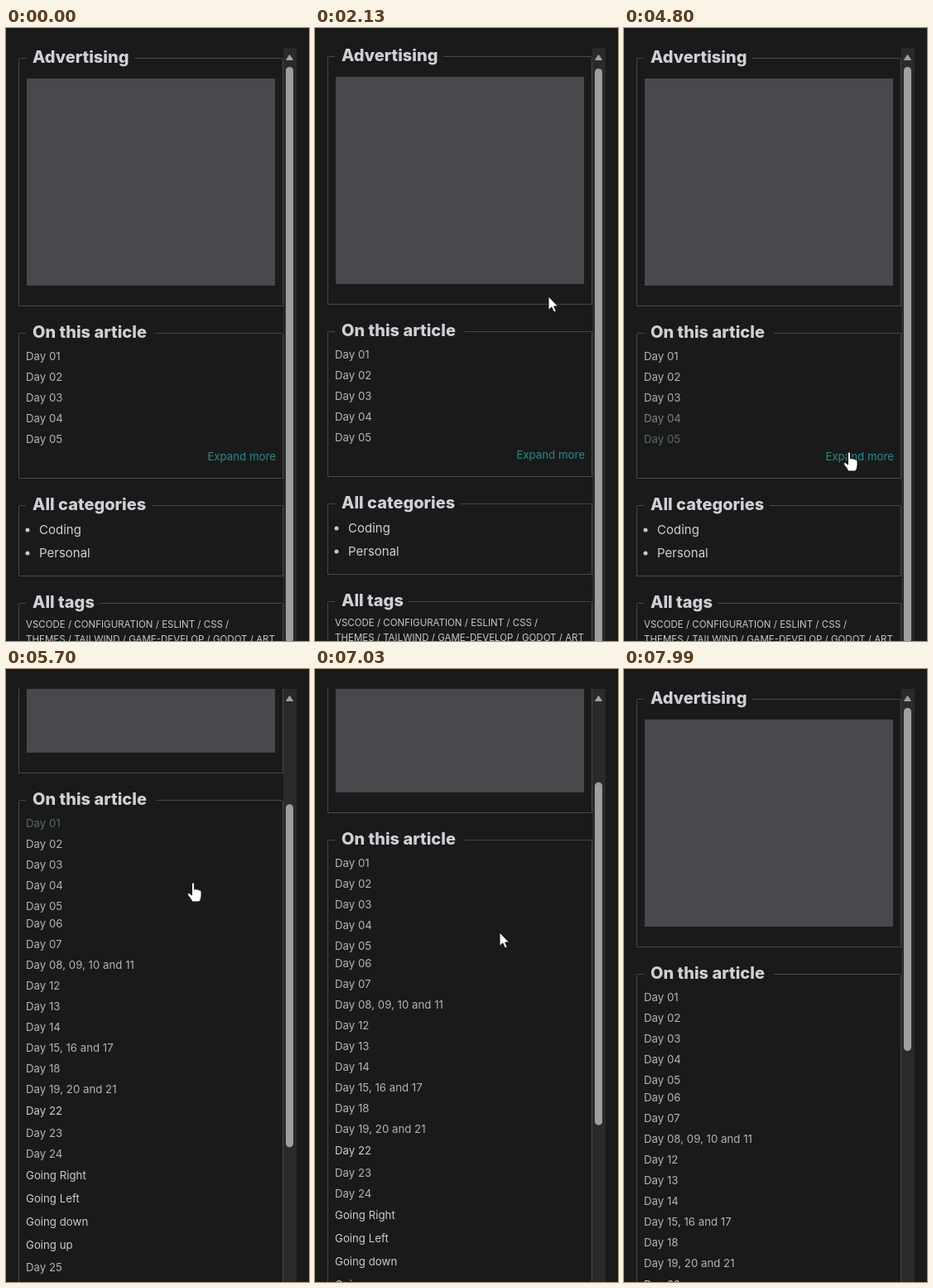
These frames come from a looping animation (366 by 740 pixels, 8.19 s). An HTML page:

```html
<!DOCTYPE html>
<html lang="en">
<head>
<meta charset="utf-8">
<style>
  html, body { margin: 0; height: 100%; overflow: hidden; background: #1a1a1a; }
  svg { display: block; font: 13.25px Inter, sans-serif; fill: #c8c8cc; }
  .frame { fill: none; stroke: #48484b; }
  .legend { font-size: 20px; font-weight: 800; fill: #d0cfd8; }
  .item { font-size: 15px; fill: #d0d0d4; }
  .tag { font-size: 11.5px; }
</style>
</head>
<body>
<svg width="366" height="740" viewBox="0 0 366 740">
  <clipPath id="view"><rect y="24" width="366" height="716"/></clipPath>
  <g clip-path="url(#view)">
    <g id="page">
      <rect x="25" y="61" width="300" height="250" fill="#48494d"/>
      <g id="upper"></g>
      <g id="list"></g>
      <text id="toggle" x="326" y="522" text-anchor="end" fill="#2a8a87"></text>
      <g id="lower"></g>
    </g>
  </g>
  <rect x="335" y="24" width="16" height="716" fill="#2a2a2a"/>
  <path d="M338.5 38.5L342.5 32.5L346.5 38.5Z" fill="#a0a0a0" stroke="#a0a0a0" stroke-linejoin="round"/>
  <rect id="thumb" x="338" width="9" rx="4.5"/>
  <g id="cursor" fill="#fff" stroke="#111" stroke-linejoin="round">
    <path id="arrow" d="M0 0V16.5L3.8 13L6.5 19L9.3 17.8L6.7 12H11.5Z"/>
    <path id="hand" d="M-1.5 1Q0 -1.5 1.5 1V8Q3.2 6.5 4.5 8.3Q6.2 7.2 7.4 9Q10 8.3 10 11V16Q10 20 7.5 23H-1Q-3 19 -6 15.5Q-7.5 12.5 -5 12.3L-1.5 15Z"/>
  </g>
</svg>
<script>
const LOOP = 8190, TICK = 10, EXPAND_AT = 4930, LEAVE_AT = 7950;
const EXTRA = 511; // height added by expanding the list
const HOVER_STEP = 110, FADE = 200, HOVER_COLOR = [84, 106, 110];
const $ = id => document.getElementById(id);

const text = (x, y, str, cls) => `<text class="${cls}" x="${x}" y="${y}">${str}</text>`;
const box = (top, height, gapEnd, title) =>
  `<path class="frame" d="M24 ${top}H16.5Q15.5 ${top} 15.5 ${top + 1}v${height - 1}H334.5V${top + 1}Q334.5 ${top} 333.5 ${top}H${gapEnd}"/>` +
  text(32, top + 5, title, "legend");

$("lower").innerHTML =
  box(576.5, 85, 176, "All categories") +
  ["Coding", "Personal"].map((name, i) =>
    `<circle cx="26" cy="${606 + 28 * i}" r="2.5"/>` + text(40, 611 + 28 * i, name, "item")).join("") +
  box(694.5, 82, 113, "All tags") +
  ["VSCODE / CONFIGURATION / ESLINT / CSS /", "THEMES / TAILWIND / GAME-DEVELOP / GODOT / ART"]
    .map((line, i) => text(24, 724 + 18 * i, line, "tag")).join("");

// Rows marked with * are taller and brighter
const labels = ["Day 01", "Day 02", "Day 03", "Day 04", "Day 05", "Day 06", "Day 07",
  "Day 08, 09, 10 and 11", "Day 12", "Day 13", "Day 14", "Day 15, 16 and 17", "Day 18",
  "Day 19, 20 and 21", "*Day 22", "Day 23", "Day 24", "*Going Right", "*Going Left",
  "*Going down", "*Going up", "Day 25", "Day 26", "Day 27, 28, 29 and 30", "Final thoughts"];
const SHORT = 5; // rows shown while collapsed
let edge = 383.5;
const rows = labels.map((label, i) => {
  const big = label[0] === "*", height = big ? 28 : 25;
  if (i === SHORT) edge -= 4;
  const y = Math.floor(edge + height / 2);
  edge += height;
  return { label: label.replace("*", ""), y, shade: big ? 204 : 180 };
});
$("list").innerHTML = rows.map(r => text(24, r.y + 5, r.label, "row")).join("");
rows.forEach((r, i) => r.el = $("list").children[i]);

function ease(t, from, to) {
  const p = Math.min(1, Math.max(0, (t - from) / (to - from)));
  return p * p * (3 - 2 * p);
}

// Each ride scrolls down to a depth and back to the top
const rides = [
  { depth: 15, down: [1380, 1600], up: [1900, 2200] },
  { depth: 526, down: [5340, 6172], up: [6180, 6604] },
  { depth: 526, down: [6910, 7235], up: [7400, 7960] }
];
const scrollAt = t => rides.reduce((sum, r) =>
  sum + r.depth * (ease(t, ...r.down) - ease(t, ...r.up)), 0);

// Cursor stops: time, x, y
const stops = [
  [0, 165, 760], [500, 250, 170], [960, 336, 238], [1640, 336, 258], [2410, 259, 352],
  [3210, 255, 343], [3550, 193, 184], [4460, 234, 442], [4800, 272, 512], [5280, 270, 512],
  [5500, 226, 258], [5700, 226, 258], [6100, 221, 324], [7030, 223, 318], [7750, 347, 330]
];
function cursorAt(t) {
  let [, x, y] = stops[0];
  for (let i = 1; i < stops.length; i++) {
    const p = ease(t, stops[i - 1][0], stops[i][0]);
    x += (stops[i][1] - x) * p;
    y += (stops[i][2] - y) * p;
  }
  return [x, y];
}

// Row under the cursor, "toggle" for the expand link, or nothing
function hit(t) {
  const [x, y] = cursorAt(t), docY = y + scrollAt(t);
  const open = t >= EXPAND_AT;
  if (t < 0 || x < 24 || x > 326) return null;
  if (x > 244 && Math.abs(docY - 517 - (open ? EXTRA : 0)) < 10) return "toggle";
  return rows.find((r, i) => (open || i < SHORT) && Math.abs(docY - r.y) < 12);
}

let wasOpen;
function setOpen(open) {
  if (open === wasOpen) return;
  wasOpen = open;
  const extra = open ? EXTRA : 0;
  $("upper").innerHTML =
    box(36.5, 299, 155, "Advertising") + box(368.5, 175 + extra, 181, "On this article");
  $("toggle").textContent = open ? "Expand less" : "Expand more";
  for (const id of ["toggle", "lower"]) $(id).setAttribute("transform", `translate(0 ${extra})`);
  rows.forEach((r, i) => r.el.style.display = open || i < SHORT ? "" : "none");
}

function draw(t) {
  const [x, y] = cursorAt(t), scroll = scrollAt(t);
  const open = t >= EXPAND_AT, present = t < LEAVE_AT;
  setOpen(open);
  $("page").setAttribute("transform", `translate(0 ${-Math.round(scroll)})`);

  // Hover is checked at intervals and fades out afterwards
  const check = Math.floor(t / HOVER_STEP) * HOVER_STEP;
  const levels = new Map();
  for (let start = check - 2 * HOVER_STEP; start <= check; start += HOVER_STEP) {
    const age = Math.max(0, t - start - HOVER_STEP);
    levels.set(hit(start), Math.max(0, 1 - age / FADE));
  }
  for (const r of rows) {
    const level = levels.get(r) || 0;
    r.el.style.fill = `rgb(${HOVER_COLOR.map(c => r.shade + (c - r.shade) * level)})`;
  }

  const thumb = $("thumb");
  thumb.setAttribute("y", 47 + scroll * (open ? 0.553 : 0.92));
  thumb.setAttribute("height", open ? 414 : 695);
  thumb.setAttribute("fill", x >= 335 && present ? "#cfcfcf" : "#9f9f9f");

  const pointing = !!hit(check);
  $("hand").style.display = pointing ? "" : "none";
  $("arrow").style.display = pointing ? "none" : "";
  $("cursor").style.display = present ? "" : "none";
  $("cursor").setAttribute("transform", `translate(${Math.round(x)} ${Math.round(y)})`);
}

const began = performance.now();
function tick() {
  const t = (performance.now() - began) % LOOP;
  draw(Math.floor(t / TICK) * TICK);
  requestAnimationFrame(tick);
}
tick();
</script>
</body>
</html>
```
